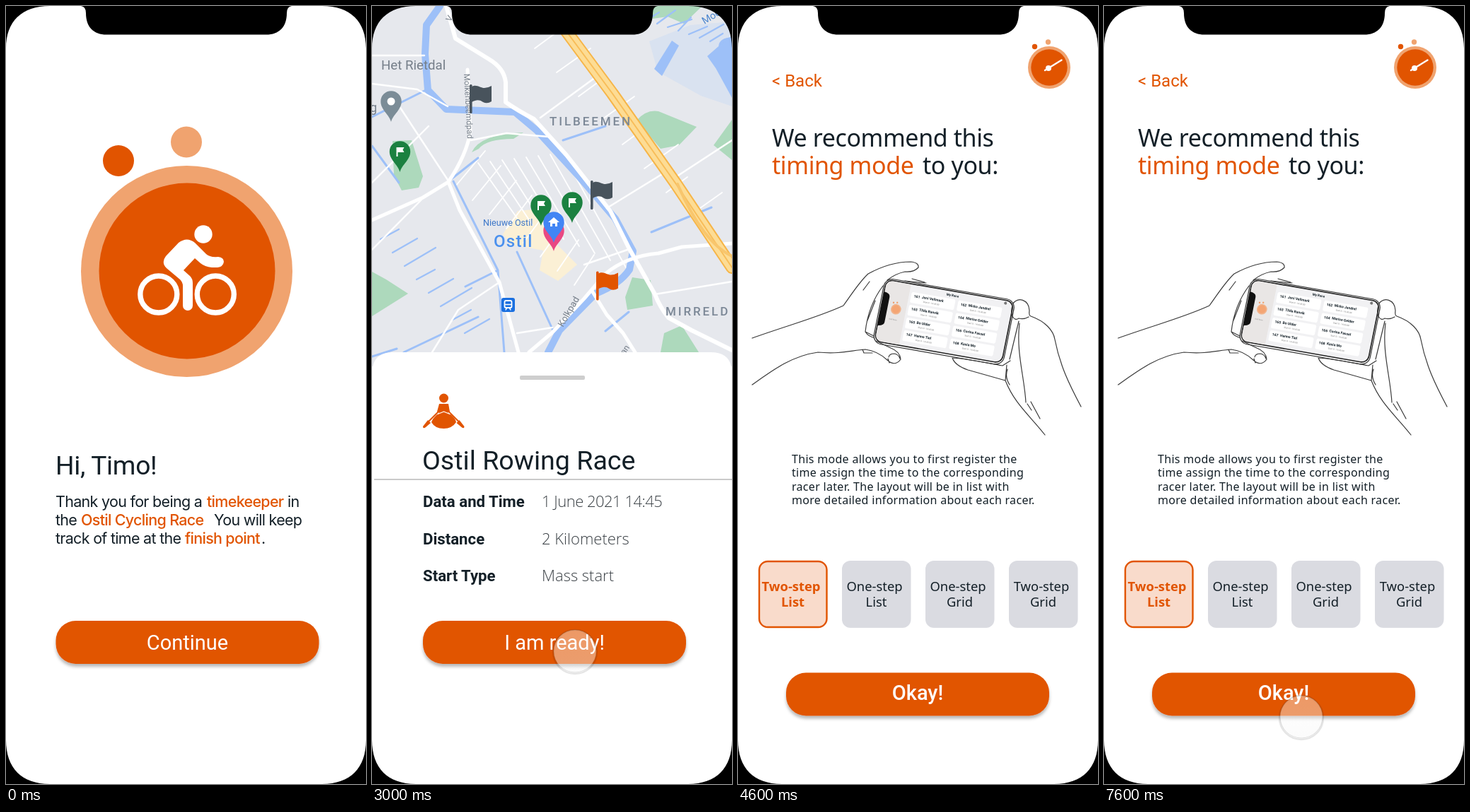
Write an HTML page that moves like this. It is 509 px wide and 1101 px high and loops after 8000 ms.

```html
<!DOCTYPE html>
<html lang="en">
<head>
<meta charset="utf-8">
<title>Race timekeeping app</title>
<style>
html, body { margin: 0; width: 100%; height: 100%; overflow: hidden; background: #fff; }
svg { display: block; width: 100%; height: 100%; }
text { white-space: pre; }
.rob { font-family: Roboto, sans-serif; }
.int { font-family: Inter, sans-serif; letter-spacing: -.7px; }
.noto { font-family: "Noto Sans", sans-serif; }
.open { font-family: "Open Sans", sans-serif; font-weight: 300; }
.line { fill: none; stroke: #3a3a3a; stroke-width: 1.2; stroke-linecap: round; stroke-linejoin: round; }
.net { fill: none; stroke-linejoin: round; stroke-linecap: round; }
</style>
</head>
<body>
<svg id="stage" viewBox="0 0 509 1101" preserveAspectRatio="none"></svg>
<script>
const ORANGE = '#e15400', PEACH = '#f0a36f', INK = '#131f27';
const LOOP = 8000, STEP = 100;

const text = (x, y, size, str, cls = 'rob', attrs = '') =>
  `<text x="${x}" y="${y}" font-size="${size}" class="${cls}" ${/fill=/.test(attrs) ? '' : `fill="${INK}"`} ${attrs}>${str}</text>`;
const disc = (x, y, r, fill) => `<circle cx="${x}" cy="${y}" r="${r}" fill="${fill}"/>`;
const shape = (d, fill) => `<path d="${d}" fill="${fill}"/>`;
const net = (d, color, width) => `<path class="net" d="${d}" stroke="${color}" stroke-width="${width}"/>`;
const at = (x, y, body) => `<g transform="translate(${x} ${y})">${body}</g>`;
const turned = (x, y, deg, size, str, color) =>
  text(0, 0, size, str, 'rob', `fill="${color}" transform="translate(${x} ${y}) rotate(${deg})"`);

const button = (x, y, label, weight = 400) =>
  `<rect x="${x}" y="${y}" width="372" height="61" rx="28" fill="${ORANGE}" filter="url(#drop)"/>` +
  text(x + 186, y + (weight > 400 ? 38 : 41), 29, label, 'rob', `fill="#fff" text-anchor="middle" font-weight="${weight}"`);

// Welcome
function welcome() {
  const hot = `fill="${ORANGE}" font-weight="500"`;
  const para = (x, y, str, attrs) => text(x, y, 21.5, str, 'int', attrs);
  const wheel = x => `<circle cx="${x}" cy="408" r="26" fill="none" stroke="#fff" stroke-width="7.4"/>`;
  return disc(159, 219, 22, ORANGE) + disc(255, 192.5, 22, PEACH) +
    disc(255.5, 375.5, 149.5, PEACH) + disc(256, 375, 124.5, ORANGE) +
    wheel(215.8) + wheel(296.3) + disc(279, 323, 12.7, '#fff') +
    shape(`M244 335Q256 326 267 335L283 351Q288 356 300 355Q308 356 308 362Q307 369 299 370H291
      Q281 369 275 364L267 357L251 374L260 382Q264 386 264 392V424A7 7 0 0 1 250 424V396
      Q250 391 246 387L227 371Q219 363 226 354Z`, '#fff') +
    text(70, 663, 37.2, 'Hi, Timo!', 'rob', 'letter-spacing="-.3"') +
    para(70, 709, 'Thank you for being a') + para(284, 709, 'timekeeper', hot) + para(398, 709, 'in') +
    para(70, 735, 'the') + para(106, 735, 'Ostil Cycling Race', hot) + para(294, 735, 'You will keep') +
    para(70, 761, 'track of time at the') + para(253, 761, 'finish point', hot) + para(361, 761, '.') +
    button(70.5, 870, 'Continue');
}

// Map
const pin = (x, y, color, icon = '') => at(x, y,
  shape('M0 29C-3 18 -14.7 12 -14.7 0A14.7 14.7 0 1 1 14.7 0C14.7 12 3 18 0 29Z', color) + icon);
const flag = (x, y, color) => at(x, y,
  `<rect width="3.6" height="41" rx="1.5" fill="${color}"/>` +
  shape('M3 3C10 -1 15 5 21 5Q26 5 31 2V24Q25 28 19 25C13 21 9 22 3 25Z', color));

function map() {
  const WATER = '#9dc0f8', GREEN = '#add9bc', GREY = '#757e89', BLUE = '#4285f4';
  const teeFlag = shape('M-5 -6H6L4 -2.5L6 1H-3V7H-5Z', '#fff');
  const house = shape('M-8 0L0 -7L8 0H5V6H2V2H-2V6H-5V0Z', '#fff');
  let streets = '', ditches = '';
  for (let i = 0; i < 8; i++) {
    streets += `M${160 + i * 22} ${205 + i * 21}l${-42 + i * 2} ${50 - i}`;
    streets += `M${150 + i * 17} ${222 - i * 2}L${205 + i * 22} ${300 + i * 10}`;
    streets += `M${230 + i * 31} ${60 + i * 34}l${i % 2 ? 48 : 30} -${i % 2 ? 34 : 22}`;
    ditches += `M${12 + i * 17} ${330 + i * 19}l${26 + i % 3 * 9} -${14 + i % 3 * 6}`;
    ditches += `M${388 + i * 15} ${20 + i * 5}l${18 + i % 3 * 8} ${-11 - i % 2 * 8}`;
  }
  const road = 'M105 0L118 46L165 75Q187 88 189 108V136Q206 148 229 160L275 211L337 290L364 344L400 408Q407 426 419 441L452 459L509 487';
  const west = 'M135 90L139 178Q134 210 108 249L72 271L0 303M108 249L124 289L180 391L207 490';
  const south = 'M222 490L255 462L300 414L330 379Q360 354 405 350L438 341L509 336M311 403L332 437L355 463L372 490';
  const motorway = 'M272 32L340 124L430 252L509 370';
  return `<rect width="509" height="510" fill="#e6e8ed"/>` +
    shape('M392 50L450 27L509 22V142L465 127L404 93Z', '#d9e2f0') +
    shape('M509 44Q491 45 490 57L474 71L486 88L509 130Z', WATER) +
    shape('M424 49L434 56L410 99L399 89Z', WATER) +
    shape('M374 162Q388 146 405 149L459 171L434 197L408 202Z', GREEN) +
    shape('M509 161L483 197L509 218Z', GREEN) +
    shape('M393 0H467L441 25L418 15L397 18Z', GREEN) +
    shape('M29 191L56 190L72 241L66 257L42 261L31 240Z', GREEN) +
    shape('M0 376L20 387L51 407L0 439Z', GREEN) +
    shape('M141 207Q153 181 214 179L200 188Q162 188 151 202Z', GREEN) +
    shape('M368 384L394 388L397 424L361 430L358 412Z', GREEN) +
    shape('M413 463L438 452L462 490H408Z', GREEN) +
    shape('M206 290L249 286L268 310L261 337L290 366L263 389L237 374L242 346L196 337L185 323Z', '#fbf0d5') +
    net(ditches, WATER, 2.2) + net(streets, '#fff', 1.8) +
    net('M0 157L76 119M0 198L38 250M115 248L178 374L187 490M178 374L132 397M150 215L112 245M45 490L150 440M270 190L330 170M205 348L260 468M395 320L480 285M0 496L35 485M330 460L363 433', WATER, 3) +
    net('M96 0L77 27L75 68L79 119L105 146L202 150L234 177L289 237L344 301L369 347L364 373Q350 394 316 407L265 459L249 490', WATER, 10) +
    net('M0 70L74 70M0 110L64 118L107 142M40 144L107 246M0 250L80 170M238 158L320 98M332 286L410 238M364 344L300 366M205 463L255 455M0 345L72 272M85 490L122 430L180 391M140 190L190 180L250 185M400 408L509 390M425 245L509 190', '#fff', 2.4) +
    net(west, '#fff', 5) + net(south, '#fff', 5) + net(road, '#fff', 6) +
    net(motorway, '#f6b548', 18) + net(motorway, '#fddc94', 14) + net(motorway, '#f8bd59', 2) +
    net('M432 252Q468 335 509 354', '#f8c66d', 4) +
    text(13, 90, 18.7, 'Het Rietdal', 'rob', `fill="${GREY}"`) + text(-3, 150, 18, 'g', 'rob', `fill="${GREY}"`) +
    turned(130, 96, 87, 11.5, 'Molkenbeemdpad', GREY) + turned(270, 455, -60, 13, 'Kolkpad', GREY) +
    turned(111, 23, -60, 12, 'V', GREY) + turned(357, 494, -55, 12, 'an', GREY) +
    turned(470, 26, -31, 14, 'Moer', '#4b85ce') +
    text(251, 169, 17, 'TILBEEMEN', 'rob', 'fill="#7b8796" font-weight="500" letter-spacing="2.9"') +
    text(415, 438, 17, 'MIRRELD', 'rob', 'fill="#7b8796" font-weight="500" letter-spacing="2.9"') +
    text(157, 311, 12.6, 'Nieuwe Ostil', 'rob', 'fill="#3d77c9"') +
    text(172, 341, 24, 'Ostil', 'rob', 'fill="#4a90ee" font-weight="500" letter-spacing="1.3"') +
    `<rect x="183" y="413" width="19" height="20" rx="3" fill="#1a6fe0"/>` +
    `<rect x="187.5" y="417" width="10" height="10" rx="2" fill="none" stroke="#fff" stroke-width="1.8"/>` +
    net('M188 422.5H197M189 430L191 427M196 430L194 427', '#fff', 1.4) +
    pin(27, 135, '#7b8c97', disc(0, 0, 5.5, '#fff')) + pin(39.5, 206, '#1b8140', teeFlag) +
    pin(239, 282, '#1b8140', teeFlag) + pin(283, 278, '#1b8140', teeFlag) +
    pin(257, 318, '#e94882') + pin(257, 306, BLUE, house) +
    flag(138, 111, '#48535c') + flag(309, 247, '#48535c') + flag(317, 375.5, ORANGE);
}

function race() {
  const row = (y, name, value, gap = 0) =>
    text(72, y, 22.2, name, 'rob', 'font-weight="700"') +
    text(240, y, 22, value, 'open', `fill="#3c4247" letter-spacing="${gap}"`);
  const oar = 'M94 574L78 590';
  const blade = 'M72 595L79 586L83 590L76 596Q72 599 72 595Z';
  const side = net(oar, ORANGE, 2) + shape(blade, ORANGE);
  return map() + shape('M0 520Q0 490 30 490H479Q509 490 509 520V1101H0Z', '#fff') +
    `<rect x="209" y="523" width="92" height="6" rx="2" fill="#cecece"/>` +
    disc(101.5, 555, 6.5, ORANGE) + side + `<g transform="matrix(-1 0 0 1 202.5 0)">${side}</g>` +
    shape('M95 563H108L110 574L105 577H97L92 574Z', ORANGE) +
    shape('M101.5 574C110 575 118 583 119 589Q113 598 101.5 598Q89 598 84 589C86 583 93 575 101.5 574Z', ORANGE) +
    net('M93 577.5L101.5 574L110 577.5', '#fff', 1.3) +
    text(71, 656, 37.6, 'Ostil Rowing Race') +
    `<path d="M3 670H509" stroke="#b9b9b9" stroke-width="1.4"/>` +
    row(709, 'Data and Time', '1 June 2021 14:45', -.5) +
    row(762, 'Distance', '2 Kilometers') + row(814, 'Start Type', 'Mass start') +
    button(72, 870, 'I am ready!');
}

// Timing mode
function handset() {
  const names = ['Joni Vellmark', 'Mirko Jandrel', 'Tilda Ranvik', 'Marise Gelder', 'Bo Ulder', 'Corina Fassel', 'Hanno Tiel', 'Kasia Mo'];
  const cards = names.map((name, i) => {
    const x = 38 + i % 2 * 66, y = 11 + (i >> 1) * 18;
    return `<rect x="${x}" y="${y}" width="62" height="15" rx="2.5" fill="#fff"/>` +
      text(x + 4, y + 7, 5, 161 + i, 'rob', 'font-weight="700"') +
      text(x + 15, y + 6.5, 5, name, 'rob', 'font-weight="700"') +
      text(x + 18, y + 12, 3, 'Start 0 - 14:45:00', 'rob', 'fill="#777"');
  }).join('');
  return `<g transform="matrix(1 .175 -.2 1 210 387)">
    <rect x="-2" y="-2" width="184" height="92" rx="12" fill="#fff" stroke="#333" stroke-width="1.2"/>
    <rect width="180" height="87" rx="10" fill="#f1f1f3" stroke="#222" stroke-width="1.6"/>
    <path d="M10 1H35V86H10Q1 86 1 77V10Q1 1 10 1Z" fill="#e9e6e5"/>
    <path d="M0 17Q9 18 9 23V59Q9 64 0 65Z" fill="#111"/>` +
    disc(21, 38.5, 7.2, '#f1b48c') + disc(21, 38.5, 5.6, '#f4a573') + disc(16, 30, 1.2, '#ec9b6b') + disc(21, 29, 1.2, PEACH) +
    text(14, 54, 2.5, 'Ostil Race', 'rob', 'fill="#888"') +
    text(86, 7.5, 4.5, 'My Race', 'rob', 'font-weight="700"') + disc(169, 4, 2, '#777') + cards + '</g>';
}

function hands() {
  const back = `M20 470C70 452 115 440 149 424C160 409 171 391 184 379C204 368 224 362 244 362Q256 363 255 370
    Q249 377 236 376Q222 379 211 388M205 396Q184 424 180 461Q184 468 195 470M194 417L183 445M186 390L177 402
    M236 389L266 392M246 386L264 391M180 461L192 467`;
  const front = `M20 536C48 516 76 495 113 490C146 493 161 487 180 486Q197 488 211 501Q222 511 230 500Q229 489 216 484L195 474
    M176 486L178 491L190 491M213 497Q214 492 221 492Q227 493 229 499M214 505L212 499`;
  const right = `M388 422C396 411 411 415 412 431Q411 438 414 439C434 446 446 459 448 472C455 508 468 535 485 567
    M388 424C384 437 390 447 397 442Q404 444 411 440M397 446L384 500M398 449C393 490 405 525 407 561
    M303 498C325 499 350 505 374 509L385 502M303 498Q307 509 325 515L378 530L380 508
    M378 530C391 563 413 580 434 607M381 514Q377 525 384 536M409 563L415 572M414 560L427 584`;
  return `<path class="line" d="${back}"/>` + handset() + `<path class="line" d="${front}${right}"/>`;
}

function mode() {
  const head = (x, y, str, color = INK) => text(x, y, 34, str, 'noto', `letter-spacing="-.4" fill="${color}"`);
  const about = ['This mode allows you to first register the', 'time assign the time to the corresponding',
    'racer later. The layout will be in list with', 'more detailed information about each racer.'];
  const tile = ([top, low], i) => {
    const x = 29 + i * 118, on = i === 0;
    const style = `text-anchor="middle" ` + (on ? `font-weight="700" fill="${ORANGE}"` : '');
    return `<rect x="${x + on}" y="${785 + on}" width="${on ? 95.5 : 97.5}" height="${on ? 93 : 95}" rx="12" ` +
      (on ? `fill="#f9dbcb" stroke="${ORANGE}" stroke-width="2.4"/>` : 'fill="#dadbe1"/>') +
      text(x + 46, 828, 18.4, top, 'noto', style) + text(x + 48.5, 850, 18.4, low, 'noto', style);
  };
  return text(48, 113.5, 24, '&lt; Back', 'rob', `fill="${ORANGE}"`) +
    disc(419.5, 57.5, 3.7, ORANGE) + disc(438.5, 51, 3.7, PEACH) + disc(440, 87, 30, PEACH) + disc(440, 87, 25.7, ORANGE) +
    net('M434 91L457.5 76.5', '#fff', 2.4) + disc(439, 88, 4, '#fff') +
    head(48, 199, 'We recommend this') + head(48, 238, 'timing mode', ORANGE) + head(261, 238, 'to you:') +
    hands() +
    about.map((s, i) => text(76, 647 + i * 19.4, 16, s, 'noto', 'letter-spacing=".3"')).join('') +
    [['Two-step', 'List'], ['One-step', 'List'], ['One-step', 'Grid'], ['Two-step', 'Grid']].map(tile).join('') +
    button(68, 943.5, 'Okay!', 500);
}

const stage = document.getElementById('stage');
stage.innerHTML = `<defs>
  <filter id="drop" x="-5%" y="-10%" width="110%" height="135%">
    <feDropShadow dx="0" dy="4" stdDeviation="2" flood-color="#000" flood-opacity=".28"/></filter>
  <linearGradient id="glass" x1="0" y1="0" x2="0" y2="1">
    <stop offset="0" stop-color="#fff" stop-opacity=".4"/>
    <stop offset="1" stop-color="#f6f6f6" stop-opacity=".45"/></linearGradient></defs>
  <rect width="509" height="1101" fill="#fff"/>
  <g class="screen">${welcome()}</g><g class="screen">${race()}</g><g class="screen">${mode()}</g>
  <g id="touch"><circle cy="1" r="31" fill="none" stroke="#000" stroke-opacity=".1" stroke-width="2.4"/>
    <circle r="30" fill="url(#glass)" stroke="#777" stroke-opacity=".22"/></g>
  <path fill-rule="evenodd" d="M0 0H509V1101H0ZM0 60V1039C0 1078 22 1101 62 1101H447C487 1101 509 1078 509 1039V60
    C509 22 487 0 447 0H62C22 0 0 22 0 60Z"/>
  <path d="M106 0Q113 1 113 10C113 30 124 40.5 142 40.5H368C386 40.5 397 30 397 10Q397 1 404 0Z"/>`;

const screens = [...stage.querySelectorAll('.screen')];
const touch = document.getElementById('touch');

// Each key: time, x, y
const firstTap = [[2100, 446, 1085], [2400, 368, 1000], [2700, 300, 926], [2900, 287, 913]];
const lastTap = [[6300, 287, 940], [6500, 284, 956], [6800, 274, 990], [7100, 278, 1000], [7600, 279, 1006]];

function along(keys, t) {
  const i = keys.findIndex(k => k[0] > t);
  if (i < 0) return keys[keys.length - 1].slice(1);
  const a = keys[i - 1], b = keys[i], p = (t - a[0]) / (b[0] - a[0]);
  return [a[1] + (b[1] - a[1]) * p, a[2] + (b[2] - a[2]) * p];
}

function draw(ms) {
  const t = Math.floor(ms % LOOP / STEP) * STEP;
  const current = t < 3000 ? 0 : t < 4600 ? 1 : 2;
  screens.forEach((s, i) => s.style.display = i === current ? '' : 'none');
  const keys = t >= 2100 && t < 4500 ? firstTap : t >= 6300 ? lastTap : null;
  touch.style.display = keys ? '' : 'none';
  if (keys) touch.setAttribute('transform', `translate(${along(keys, t)})`);
}

const start = performance.now();
function tick() {
  draw(performance.now() - start);
  requestAnimationFrame(tick);
}
tick();
</script>
</body>
</html>
```
